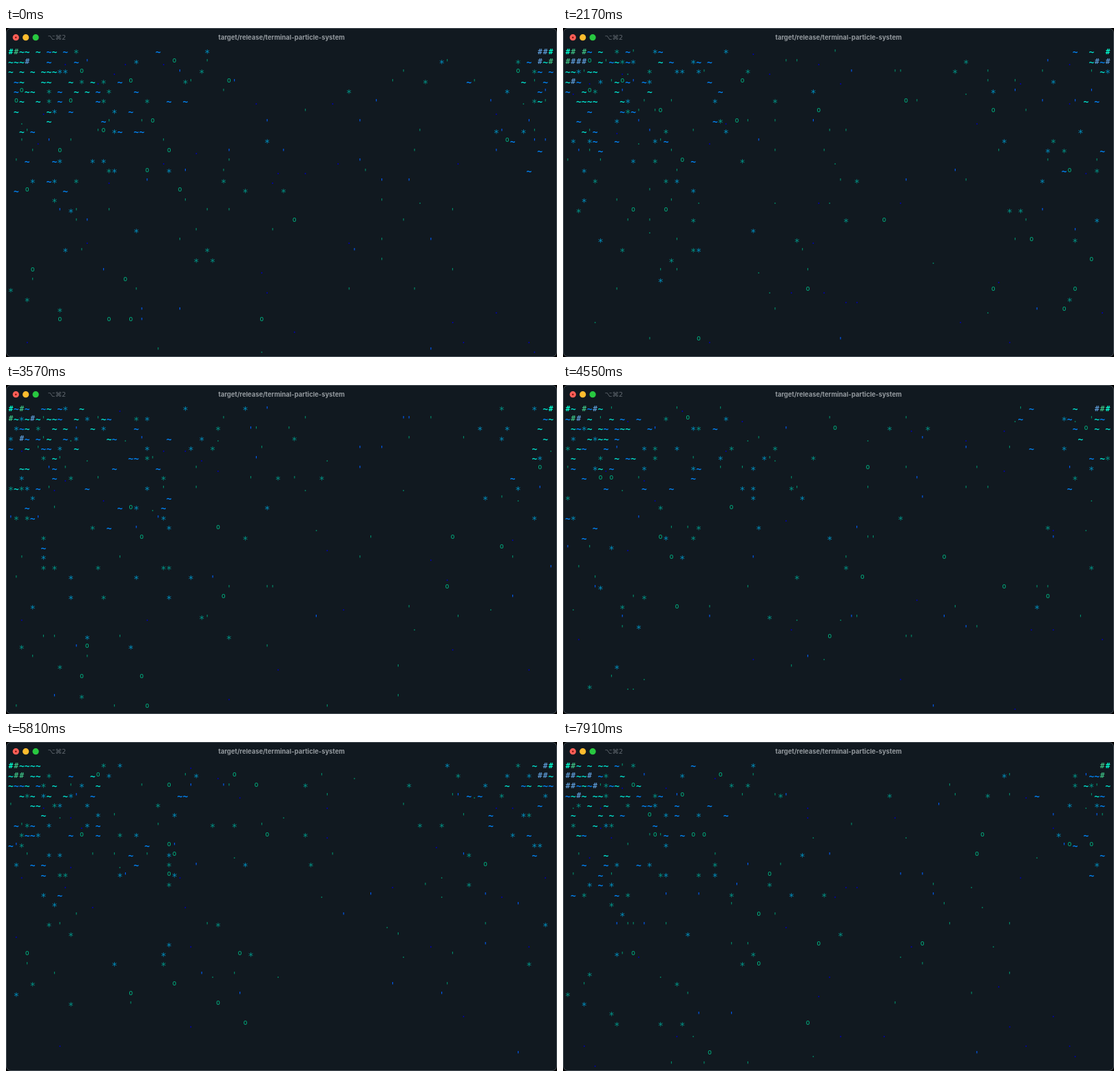
An HTML page for the animation above (7980 ms loop, 800 by 477 pixels).

```html
<!DOCTYPE html>
<html lang="en">
<head>
<meta charset="utf-8">
<title>terminal-particle-system</title>
<style>
  html, body { margin: 0; width: 100%; height: 100%; overflow: hidden; background: #000; }
  svg { display: block; width: 800px; height: 477px; }
  #particles { font-family: "DejaVu Sans Mono", monospace; text-anchor: middle; }
  .title { font: 700 9.4px Inter, sans-serif; fill: #949a9f; text-anchor: middle; }
  .shortcut { font: 9.5px "DejaVu Sans", sans-serif; fill: #626970; }
</style>
</head>
<body>
<svg viewBox="0 0 800 477">
  <rect x=".5" y=".5" width="799" height="476" rx="6.5" fill="#111920" stroke="#485057"/>
  <circle cx="14.3" cy="13.7" r="4.6" fill="#ff5f57"/>
  <circle cx="14.3" cy="13.7" r="1.3" fill="#7d1410"/>
  <circle cx="28.7" cy="13.7" r="4.6" fill="#febc2e"/>
  <circle cx="43.1" cy="13.7" r="4.6" fill="#28c840"/>
  <text class="shortcut" x="60.5" y="17.3">⌥⌘2</text>
  <text class="title" x="400" y="17">target/release/terminal-particle-system</text>
  <g id="particles"></g>
</svg>
<script>
const STEP_MS = 70, STEPS = 114;
const COLS = 100, ROWS = 31;
const CELL = { x: 7, y: 34, w: 7.92, h: 14.4 };

// Font size, weight and baseline offset of each glyph inside its cell.
const GLYPHS = {
  '#': { size: 11, weight: 700, dy: 4 },
  '~': { size: 13, weight: 700, dy: 5.3 },
  '*': { size: 14, weight: 400, dy: 7.3 },
  'o': { size: 10, weight: 400, dy: 1.8 },
  "'": { size: 13, weight: 400, dy: 5.8 },
  '.': { size: 12, weight: 400, dy: 5.2 }
};

// A particle passes through these looks; share is the part of its life.
const STAGES = [
  { glyph: '#', color: '#00ffd0', share: .010 },
  { glyph: '#', color: '#3cba80', share: .015 },
  { glyph: '#', color: '#5a96d0', share: .025 },
  { glyph: '~', color: '#00e6d2', share: .10 },
  { glyph: '~', color: '#0087ff', share: .12 },
  { glyph: '*', color: '#0090c0', share: .12 },
  { glyph: '*', color: '#009688', share: .11 },
  { glyph: 'o', color: '#00af7f', share: .05 },
  { glyph: "'", color: '#008f6b', share: .15 },
  { glyph: '.', color: '#00805f', share: .05 },
  { glyph: "'", color: '#0060ff', share: .10 },
  { glyph: '.', color: '#0000b8', share: .15 }
];

// Reach is the longest way, in pixels, that a particle covers in its life.
const EMITTERS = [
  { col: 0, dir: 1, reachX: 1150, reachY: 1000, count: 760 },
  { col: COLS - 1, dir: -1, reachX: 560, reachY: 850, count: 180 }
];

let seed = 20;
function random() {
  seed = (seed + 0x6D2B79F5) | 0;
  let n = Math.imul(seed ^ (seed >>> 15), 1 | seed);
  n ^= n + Math.imul(n ^ (n >>> 7), 61 | n);
  return ((n ^ (n >>> 14)) >>> 0) / 4294967296;
}

function createParticle(emitter) {
  const angle = random() * Math.PI / 2;
  const speed = .05 + .95 * random();
  return {
    col: emitter.col,
    vx: emitter.dir * emitter.reachX * speed * Math.cos(angle) / CELL.w,
    vy: emitter.reachY * speed * Math.sin(angle) / CELL.h,
    birth: Math.floor(random() * STEPS),
    life: 34 + Math.floor(random() * 16)
  };
}

const particles = EMITTERS.flatMap(emitter =>
  Array.from({ length: emitter.count }, () => createParticle(emitter)));

const layer = document.getElementById('particles');
for (const stage of STAGES) {
  const { size, weight } = GLYPHS[stage.glyph];
  stage.text = document.createElementNS('http://www.w3.org/2000/svg', 'text');
  stage.text.setAttribute('fill', stage.color);
  stage.text.setAttribute('font-size', size);
  stage.text.setAttribute('font-weight', weight);
  layer.append(stage.text);
}

function stageAt(age) {
  let end = 0;
  const index = STAGES.findIndex(stage => age < (end += stage.share));
  return index < 0 ? STAGES.length - 1 : index;
}

function occupiedCells(step) {
  const cells = new Map();
  for (const p of particles) {
    const age = ((step - p.birth + STEPS) % STEPS) / p.life;
    if (age >= 1) continue;
    const col = Math.round(p.col + p.vx * age);
    const row = Math.round(p.vy * age);
    if (col < 0 || col >= COLS || row >= ROWS) continue;
    // The youngest particle hides the others in its cell.
    const key = row * COLS + col;
    cells.set(key, Math.min(stageAt(age), cells.get(key) ?? Infinity));
  }
  return cells;
}

function render(step) {
  const columns = STAGES.map(() => []);
  const rows = STAGES.map(() => []);
  for (const [key, index] of occupiedCells(step)) {
    const { dy } = GLYPHS[STAGES[index].glyph];
    columns[index].push((CELL.x + key % COLS * CELL.w).toFixed(2));
    rows[index].push((CELL.y + Math.floor(key / COLS) * CELL.h + dy).toFixed(2));
  }
  STAGES.forEach(({ text, glyph }, index) => {
    text.setAttribute('x', columns[index].join(' '));
    text.setAttribute('y', rows[index].join(' '));
    text.textContent = glyph.repeat(columns[index].length);
  });
}

const start = performance.now();
let shown = 0;
function tick() {
  const step = Math.floor((performance.now() - start) / STEP_MS) % STEPS;
  if (step !== shown) render(shown = step);
  requestAnimationFrame(tick);
}
render(0);
requestAnimationFrame(tick);
</script>
</body>
</html>
```
